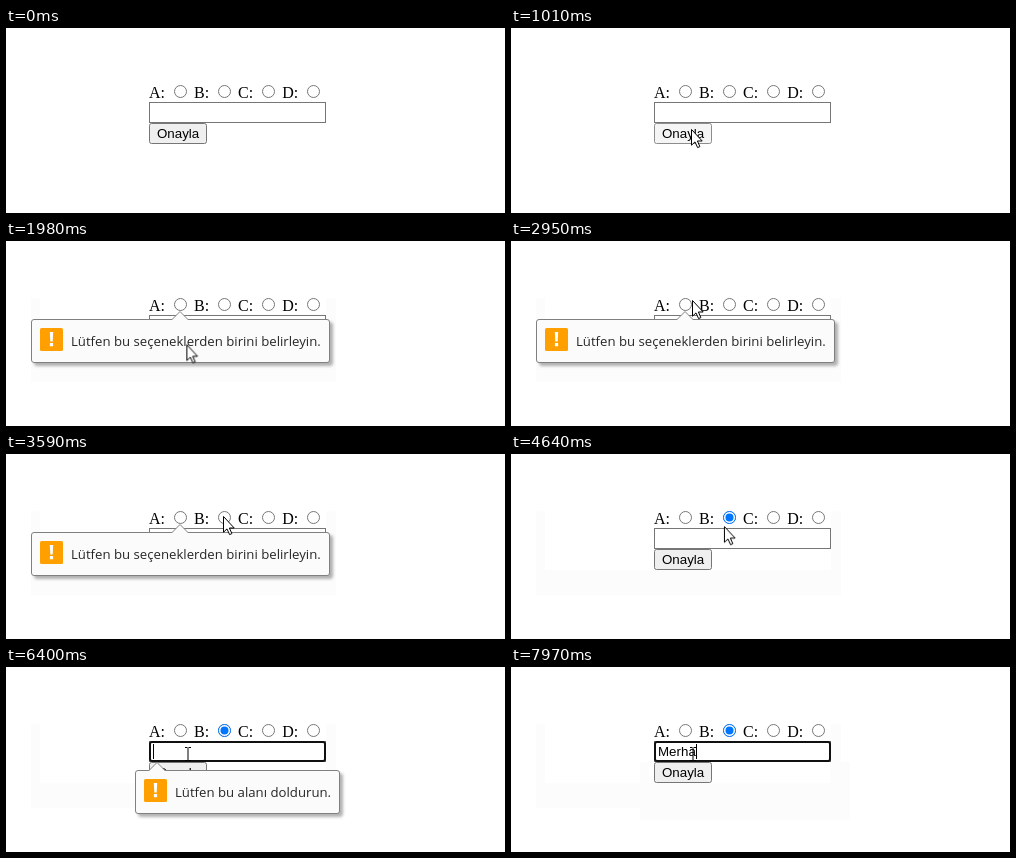
An HTML page that plays this animation: 499x185 px, repeating every 8000 ms.

```html
<!DOCTYPE html>
<html lang="tr">
<head>
<meta charset="utf-8">
<title>Form doğrulama</title>
<style>
html, body { margin: 0; width: 100%; height: 100%; overflow: hidden; background: #fff; }
svg { display: block; width: 499px; height: 185px; }

.label { font: 16px "Liberation Serif", serif; }
.ui { font: 13.333px "Liberation Sans", sans-serif; white-space: pre; }
.msg { font: 13.2px "Open Sans", "Noto Sans", sans-serif; fill: #262626; }
.line { fill: #fff; stroke: #767676; }
.trace { fill: #fcfcfc; fill-rule: evenodd; }
.box { fill: #fbfbfb; stroke: #808080; }
.panel { filter: drop-shadow(3.5px 3.5px 1.5px rgba(0, 0, 0, .3)); }

/* One loop is 8 s, so 1% is 80 ms */
.hard, .hard tspan { animation: 8s step-end infinite; }
.soft { animation: 8s linear infinite; }

#btn { animation-name: button; }
@keyframes button {
  0%, 10.1%, 62.5% { fill: #efefef; stroke: #767676; }
  9%, 14.625%, 61%, 65.125% { fill: #e5e5e5; stroke: #4f4f4f; }
  12.625%, 63.375% { fill: #f5f5f5; stroke: #8d8d8d; }
  10.1%, 62.5% { fill: #e5e5e5; stroke: #4f4f4f; }
  24%, 66.25%, to { fill: #efefef; stroke: #767676; }
}

#checked { animation-name: check; }
@keyframes check { 0% { opacity: 0; } 50.25%, to { opacity: 1; } }

#focus { animation-name: focus; }
@keyframes focus { 0% { opacity: 0; } 65.125%, to { opacity: 1; } }

#trace1 { animation-name: trace1; }
@keyframes trace1 { 0% { opacity: 0; } 24.75%, to { opacity: 1; } }
#trace2 { animation-name: trace2; }
@keyframes trace2 { 0% { opacity: 0; } 96.75%, to { opacity: 1; } }

#caret { animation-name: blink, step; }
@keyframes blink {
  0%, 71.75%, 90.875% { opacity: 0; }
  65.125%, 78.375%, 93.5%, to { opacity: 1; }
}
@keyframes step {
  0% { transform: none; }
  93.5% { transform: translateX(11px); }
  95.5% { transform: translateX(19px); }
  96.5% { transform: translateX(23px); }
  97.625% { transform: translateX(30px); }
  99.625%, to { transform: translateX(38px); }
}

#k1 { animation-name: k1; }
#k2 { animation-name: k2; }
#k3 { animation-name: k3; }
#k4 { animation-name: k4; }
#k5 { animation-name: k5; }
@keyframes k1 { 0% { fill: #0000; } 93.5%, to { fill: #000; } }
@keyframes k2 { 0% { fill: #0000; } 95.5%, to { fill: #000; } }
@keyframes k3 { 0% { fill: #0000; } 96.5%, to { fill: #000; } }
@keyframes k4 { 0% { fill: #0000; } 97.625%, to { fill: #000; } }
@keyframes k5 { 0% { fill: #0000; } 99.625%, to { fill: #000; } }

#tip1 { transform-origin: 174px 70px; animation-name: fade1, grow1; }
#tip2 { transform-origin: 151px 95px; animation-name: fade2, grow2; }
@keyframes fade1 {
  0%, 14.625%, 48.25%, to { opacity: 0; }
  17.5%, 45.25% { opacity: 1; }
}
@keyframes fade2 {
  0%, 65.125%, 96.75%, to { opacity: 0; }
  68%, 93.5% { opacity: 1; }
}
@keyframes grow1 {
  0%, 14.625% { transform: scale(.963); animation-timing-function: cubic-bezier(.333, .667, .667, 1); }
  23.375%, 45.25% { transform: none; }
  48.25%, to { transform: scale(.963); }
}
@keyframes grow2 {
  0%, 65.125% { transform: scale(.963); animation-timing-function: cubic-bezier(.333, .667, .667, 1); }
  73.875%, 93.5% { transform: none; }
  96.75%, to { transform: scale(.963); }
}

#pointer { animation-name: move; }
@keyframes move {
  0%, 5.375% { transform: translate(197px, 161px); }
  10%, 24.4% { transform: translate(180px, 101px); }
  27.875%, 33.8% { transform: translate(183px, 123px); }
  36.875%, 39.9% { transform: translate(181px, 59px); }
  44.5%, 57.375% { transform: translate(217px, 62px); }
  58% { transform: translate(213px, 72px); }
  62.25%, 65.125% { transform: translate(178px, 105px); }
  66.25% { transform: translate(177px, 120px); }
  67.5%, 74.75% { transform: translate(177px, 131px); }
  80%, to { transform: translate(182px, 87px); }
}
#arrow { animation-name: arrow; }
@keyframes arrow {
  0%, 58.4%, 79.05%, to { opacity: 0; }
  5.375%, 60.9% { opacity: 1; }
}
#beam { animation-name: beam; }
@keyframes beam {
  0%, 60.9% { opacity: 0; }
  58.4%, 79.05%, to { opacity: 1; }
}
</style>
</head>
<body>
<svg viewBox="0 0 499 185">
  <defs>
    <circle id="radio" class="line" cy="63.5" r="6"/>
    <g id="warn">
      <rect width="23" height="23" rx="1.5" fill="#ffa000"/>
      <path d="M9.8 4h3.4l-.5 9.5h-2.4zM9.9 15h3.2v3.2H9.9z" fill="#fff"/>
    </g>
    <path id="nib" class="box" d="M-8.5 .5L0 -8L8.5 .5" stroke-linejoin="round"/>
  </defs>

  <path id="trace1" class="hard trace" d="M25 57H330V141H25zM34 57H320V116H34z"/>
  <path id="trace2" class="hard trace" d="M129 95H339V153H129zM138 95H319V135H138z"/>

  <g class="label">
    <text x="143" y="70">A:</text>
    <text x="188" y="70">B:</text>
    <text x="232.1" y="70">C:</text>
    <text x="276.2" y="70">D:</text>
  </g>
  <use href="#radio" x="174.5"/>
  <use href="#radio" x="218.5"/>
  <use href="#radio" x="262.5"/>
  <use href="#radio" x="307.5"/>
  <g id="checked" class="hard">
    <circle cx="218.5" cy="63.5" r="6" fill="#fff" stroke="#0075ff"/>
    <circle cx="218.5" cy="63.5" r="4" fill="#0075ff"/>
  </g>

  <rect class="line" x="143.5" y="74.5" width="176" height="20"/>
  <rect id="focus" class="hard" x="144" y="75" width="175" height="19" rx="2" fill="#fff" stroke="#101010" stroke-width="2"/>
  <text class="ui hard" x="147" y="89"><tspan id="k1">M</tspan><tspan id="k2">e</tspan><tspan id="k3">r</tspan><tspan id="k4">h</tspan><tspan id="k5">a</tspan></text>
  <rect id="caret" class="hard" x="147" y="77" width="1" height="15"/>

  <rect id="btn" class="hard" x="143.5" y="95.5" width="57" height="20" rx="2"/>
  <text class="ui" x="151" y="110">Onayla</text>

  <g id="tip1" class="soft">
    <rect class="box panel" x="25.5" y="78.5" width="298" height="43" rx="2.5"/>
    <use href="#nib" x="174" y="78.5"/>
    <use href="#warn" x="34" y="87"/>
    <text class="msg" x="65" y="105">Lütfen bu seçeneklerden birini belirleyin.</text>
  </g>
  <g id="tip2" class="soft">
    <rect class="box panel" x="129.5" y="103.5" width="204" height="43" rx="2.5"/>
    <use href="#nib" x="151" y="103.5"/>
    <use href="#warn" x="138" y="112"/>
    <text class="msg" x="169" y="130">Lütfen bu alanı doldurun.</text>
  </g>

  <g id="pointer" class="soft">
    <path id="arrow" class="hard" d="M.5 .5V16.2L4 12.9L6.6 18.6L8.9 17.6L6.4 12H11.2z" fill="#fff" stroke="#000"/>
    <path id="beam" class="hard" d="M-3 -6.5H-.5M.5 -6.5H3M0 -6V6M-3 6.5H-.5M.5 6.5H3" fill="none" stroke="#000"/>
  </g>
</svg>
</body>
</html>
```
